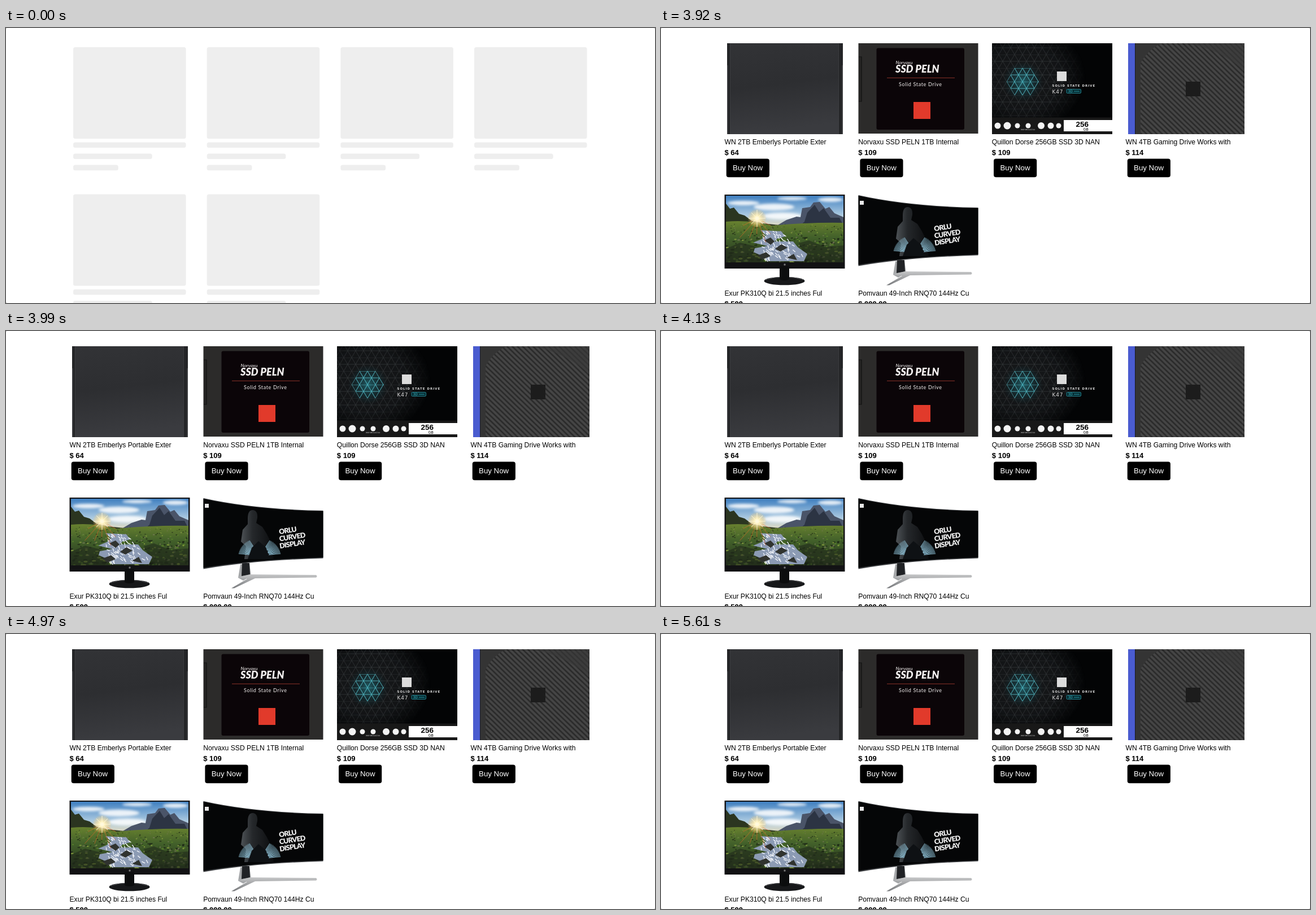
Animation, 1149 px wide and 487 px high, one loop 5.67 s. Source, as an HTML page:

```html
<!DOCTYPE html>
<html lang="en">
<head>
<meta charset="utf-8">
<title>Product grid loading</title>
<style>
  html, body { margin: 0; width: 100%; height: 100%; overflow: hidden; background: #aaa; }
  svg.stage { display: block; width: 100%; height: 100%; font-family: "Liberation Sans", Arial, sans-serif; }
  #skeleton { fill: #eee; animation: loading 5670ms step-end infinite; }
  #products { animation: loaded 5670ms step-end infinite; }
  @keyframes loading { 0% { visibility: visible } 69.1358%, 100% { visibility: hidden } }
  @keyframes loaded { 0% { visibility: hidden } 69.1358%, 100% { visibility: visible } }
  .title { font-size: 12.15px; }
  .price { font-size: 13px; font-weight: 700; }
  .buy { font-size: 13.25px; fill: #fff; }
  .lato { font-family: Lato, sans-serif; fill: #f4f1f0; }
  .wide { font-family: "DejaVu Sans", sans-serif; fill: #ddd; }
  .slogan { font: 900 12.5px Lato, sans-serif; letter-spacing: -.8px; fill: #f2f2f2; }
</style>
</head>
<body>
<svg class="stage" viewBox="0 0 1149 487">
  <defs>
    <linearGradient id="case" x2=".15" y2="1">
      <stop stop-color="#323336"/><stop offset=".5" stop-color="#2d2e31"/><stop offset="1" stop-color="#3a3b3f"/>
    </linearGradient>
    <linearGradient id="sky" x2="0" y2="1">
      <stop stop-color="#3f7fc0"/><stop offset=".55" stop-color="#a9c8e0"/><stop offset="1" stop-color="#f5e3b8"/>
    </linearGradient>
    <linearGradient id="meadow" x2="0" y2="1">
      <stop stop-color="#68812f"/><stop offset=".4" stop-color="#42602a"/><stop offset="1" stop-color="#26331c"/>
    </linearGradient>
    <linearGradient id="silver" x2="0" y2="1">
      <stop stop-color="#c6c7c8"/><stop offset="1" stop-color="#77797c"/>
    </linearGradient>
    <linearGradient id="armour">
      <stop stop-color="#4d5256"/><stop offset=".35" stop-color="#25282b"/><stop offset="1" stop-color="#0b0c0e"/>
    </linearGradient>
    <radialGradient id="sun">
      <stop stop-color="#fff"/><stop offset=".25" stop-color="#fff3c0"/><stop offset="1" stop-color="#ffc860" stop-opacity="0"/>
    </radialGradient>
    <radialGradient id="glow">
      <stop stop-color="#2da5b4" stop-opacity=".5"/><stop offset="1" stop-color="#0b4550" stop-opacity="0"/>
    </radialGradient>
    <radialGradient id="fade">
      <stop stop-color="#fff"/><stop offset=".6" stop-color="#fff" stop-opacity=".8"/><stop offset="1" stop-color="#fff" stop-opacity="0"/>
    </radialGradient>
    <pattern id="mesh" width="14" height="24" patternUnits="userSpaceOnUse" x="640" y="95">
      <rect width="14" height="24" fill="#17191b"/>
      <path d="M0 0L14 24M14 0L0 24M0 12H14M0 0H14" fill="none" stroke="#3a3d40" stroke-width=".8"/>
    </pattern>
    <pattern id="tealMesh" width="14" height="24" patternUnits="userSpaceOnUse" x="640" y="95">
      <path d="M0 0L14 24M14 0L0 24M0 12H14M0 0H14" fill="none" stroke="#53cbd8" stroke-width="1.1"/>
    </pattern>
    <pattern id="ridges" width="6.4" height="6.4" patternUnits="userSpaceOnUse" patternTransform="rotate(-46)">
      <rect width="6.4" height="6.4" fill="#454545"/><rect width="2.8" height="6.4" fill="#2b2b2b"/>
    </pattern>
    <mask id="meshFade"><ellipse cx="640" cy="88" rx="112" ry="95" fill="url(#fade)"/></mask>
    <clipPath id="scene"><path d="M115 297H323V415H115Z"/></clipPath>
    <clipPath id="curve"><path d="M350 298Q440 317 560.5 319V400Q440 403 350 418Z"/></clipPath>
    <clipPath id="chip"><path d="M586 27H799V188H586Z"/></clipPath>
    <filter id="soft"><feGaussianBlur stdDeviation="2"/></filter>
  </defs>

  <rect width="1149" height="487" rx="2" fill="#fff"/>
  <g id="skeleton"></g>

  <g id="products">
    <g id="portableDrive">
      <path d="M117 27H322V188H117Z" fill="url(#case)"/>
      <path d="M117 27H122V188H117ZM315 27H322V188H315Z" fill="#242527"/>
      <path d="M122.5 28V188M314.5 28V188" stroke="#414245" stroke-width=".7"/>
      <path d="M117 66H119V188H117ZM320 66H322V188H320Z" fill="#3b3c3f"/>
    </g>

    <g id="solidState">
      <path d="M349.5 27H561.5V187H349.5Z" fill="#2c2b2a"/>
      <path d="M350 51H355V130H350" fill="#252423" stroke="#111" stroke-width="1.2"/>
      <rect x="381.5" y="35.5" width="155.5" height="144.5" rx="3" fill="#0b0508"/>
      <text class="lato" x="415.5" y="64" font-size="8.5" font-style="italic">Norvaxu</text>
      <text class="lato" x="415" y="78.5" font-size="18" font-style="italic" font-weight="900">SSD PELN</text>
      <path d="M400 88.3H520" stroke="#8b3329"/>
      <text class="lato" x="421" y="102.5" font-size="9" letter-spacing=".65">Solid State Drive</text>
      <rect x="447" y="131" width="30" height="30" fill="#e13a2b"/>
    </g>

    <g id="chipDrive" clip-path="url(#chip)">
      <path d="M586 27H799V188H586Z" fill="#030405"/>
      <path d="M586 27H760V159H586Z" fill="url(#mesh)" mask="url(#meshFade)"/>
      <circle cx="641" cy="95" r="36" fill="url(#glow)"/>
      <path d="M626 71H654L669 95L654 119H626L612 95Z" fill="url(#tealMesh)" opacity=".7"/>
      <rect x="701" y="77" width="17" height="17" fill="#dcdcdc"/>
      <text class="wide" x="692.5" y="103.5" font-size="5.4" font-weight="700" letter-spacing="1.05">SOLID STATE DRIVE</text>
      <text class="wide" x="692.5" y="115.5" font-size="9" letter-spacing=".8">K47</text>
      <rect x="718" y="108.5" width="25.5" height="7" rx="1.5" fill="#052a30" stroke="#2b9eac" stroke-width=".8"/>
      <text class="wide" x="720.5" y="114.4" font-size="6" style="fill:#43c0ce">3D</text>
      <path d="M731 112H741" stroke="#2b9eac"/>
      <path d="M586 158.5H799V188H586Z" fill="#181818"/>
      <g id="marks" fill="#f4f4f4"></g>
      <text class="wide" x="637" y="181" font-size="3">WKP-MRX-ALT-04</text>
      <path d="M713 163H799V183H713Z" fill="#fff"/>
      <text x="734.5" y="175" font-size="13.5" font-weight="700">256</text>
      <text x="747.5" y="182" font-size="6.5">GB</text>
    </g>

    <g id="gamingDrive">
      <path d="M827 27H1033V188H827Z" fill="#343434"/>
      <path d="M849 188V62Q862 38 886 27H1033V188Z" fill="url(#ridges)"/>
      <path d="M925 27Q985 34 1033 76V27Z" fill="#3a3a3a" opacity=".6"/>
      <path d="M827 27H839V188H827Z" fill="#4a5cd0"/>
      <path d="M839.5 27V188" stroke="#191b28"/>
      <rect x="929" y="95" width="26" height="26" fill="#1c1c1c"/>
    </g>

    <g id="flatMonitor">
      <path d="M112.5 295H325.500V426H112.5Z" fill="#121214"/>
      <g clip-path="url(#scene)">
        <path d="M115 297H323V358H115Z" fill="url(#sky)"/>
        <g fill="#fff" opacity=".85" filter="url(#soft)">
          <ellipse cx="146" cy="310" rx="28" ry="4"/><ellipse cx="200" cy="317" rx="36" ry="6"/>
          <ellipse cx="232" cy="302" rx="26" ry="3"/><ellipse cx="300" cy="304" rx="22" ry="4"/>
          <ellipse cx="215" cy="333" rx="34" ry="6"/>
        </g>
        <path d="M205 350L222 340L240 334L247 335L250 319L264 317L270 309L281 308L291 320L298 317L307 328L323 335V362H205Z" fill="#4a5468"/>
        <path d="M254 343L259 327L272 313L280 326L288 319L300 336L316 336L323 350H246Z" fill="#2c3443"/>
        <path d="M115 311L122 320L129 318L138 329L148 332L160 341L180 346L210 349V365H115Z" fill="#2b3520"/>
        <path d="M115 343Q155 339 196 350Q255 344 323 345V415H115Z" fill="url(#meadow)"/>
        <g id="foliage"></g>
        <path d="M115 391L140 380L164 386L178 398L175 415H115ZM244 381L262 376L290 388L323 385V415H262Z" fill="#222c1b" opacity=".6"/>
        <path d="M176 358L213 360L220 369L206 373L201 378L234 378L242 388L259 400L253 413H190L180 404L164 397L166 390L188 386L163 380L178 374L186 367Z" fill="#8c9bb4"/>
        <g id="water" stroke="#f4f7fc" stroke-linecap="round"></g>
        <path d="M183 376L194 371L201 378L194 384ZM202 391L213 383L224 389L211 396ZM171 403L186 397L194 404L179 410ZM223 407L235 400L241 411Z" fill="#30332f"/>
        <g id="rays" stroke="#f0642a" opacity=".7"></g>
        <circle cx="170" cy="337" r="17" fill="url(#sun)"/>
        <path d="M170 322V352M155 337H185M160 327L180 347M180 327L160 347" stroke="#fff8d8" stroke-width=".9"/>
      </g>
      <circle cx="219" cy="419" r="1.7" fill="#777"/>
      <ellipse cx="218.500" cy="448" rx="36" ry="7.3" fill="#17181a"/>
      <path d="M184 446Q218 436 253 446" fill="none" stroke="#4a4b4e"/>
      <path d="M210 422H227V445Q218 449 210 445Z" fill="#0c0d0e"/>
    </g>

    <g id="curvedMonitor">
      <path d="M411 437L415 413H431L434 434L420 442Z" fill="#a5a7a9"/>
      <path d="M418 411H431L432 431L417 434Z" fill="#202225"/>
      <path d="M411 436L433 431L549 432Q552 434.500 549 436.500L441 438L404 455.500L399 455.500L427 439Z" fill="url(#silver)"/>
      <path d="M349.5 296Q440 316 561.500 318V402.500Q440 406 349.5 421.500Z" fill="#3d3f42"/>
      <path d="M349.5 297Q440 317 561.500 319V401Q440 404.500 349.5 419.500Z" fill="#050607"/>
      <g clip-path="url(#curve)">
        <path d="M428 332Q428 317 437 317Q446 318 445 331L443 340L454 347L462 360L470 376L474 404H422L425 381L416 373L419 352L428 342Z" fill="url(#armour)"/>
        <g id="fan" stroke="#94c9df" stroke-linecap="round"></g>
        <path d="M435 384L447 372L460 383L468 404H428Z" fill="#0e1114"/>
      </g>
      <rect x="352" y="306" width="7" height="7" fill="#e8e8e8"/>
      <g class="slogan" transform="translate(484 360) rotate(-9)">
        <text>ORLU</text><text x="-1.5" y="12.500">CURVED</text><text x="-3" y="25">DISPLAY</text>
      </g>
    </g>
  </g>
</svg>
<script>
  const add = (id, markup) => document.getElementById(id).insertAdjacentHTML('beforeend', markup);
  const rect = (x, y, w, h, r) => `<rect x="${x}" y="${y}" width="${w}" height="${h}" rx="${r}"/>`;
  const line = (x, y, angle, from, to, width) => {
    const c = Math.cos(angle), s = Math.sin(angle);
    return `<path d="M${x + from * c} ${y + from * s}L${x + to * c} ${y + to * s}" stroke-width="${width}"/>`;
  };

  const items = [
    ['WN 2TB Emberlys Portable Exter', '64'],
    ['Norvaxu SSD PELN 1TB Internal', '109'],
    ['Quillon Dorse 256GB SSD 3D NAN', '109'],
    ['WN 4TB Gaming Drive Works with', '114'],
    ['Exur PK310Q bi 21.5 inches Ful', '599'],
    ['Pomvaun 49-Inch RNQ70 144Hz Cu', '999.99']
  ];

  items.forEach(([title, price], i) => {
    const dx = (i % 4) * 236.67, row = Math.floor(i / 4);
    const x = 119 + dx, y = 34 + row * 260.4;
    add('skeleton', rect(x, y, 199.6, 162, 3.5) +
      [199.6, 139.7, 79.8].map((w, n) => rect(x, y + 168.4 + n * 20.1, w, 9.6, 3.5)).join(''));

    const left = 112.5 + dx, base = 206.4 + row * 268;
    add('products', `<text class="title" x="${left}" y="${base}">${title}</text>
      <text class="price" x="${left}" y="${base + 18.4}">$ ${price}</text>
      ${rect(left + 3.2, base + 25, 76.2, 32.8, 4)}
      <text class="buy" x="${left + 14.6}" y="${base + 45.6}">Buy Now</text>`);
  });

  [[596, 5.5], [613, 6.5], [631, 4.5], [650, 4.5], [673, 6], [690, 5.5], [704, 4.5]].forEach(([x, r]) =>
    add('marks', `<circle cx="${x}" cy="173" r="${r}"/>`));

  let seed = 17;
  const random = () => (seed = seed * 16807 % 2147483647) / 2147483647;
  const greens = ['#1c2615', '#96ad43', '#5f8a2c', '#34521f', '#777b58', '#161d13'];
  for (let i = 0; i < 420; i++) {
    const depth = random();
    add('foliage', `<ellipse cx="${115 + random() * 208}" cy="${347 + depth * 68}"
      rx="${1 + depth * 4 * random()}" ry="${.6 + depth * 1.3}" fill="${greens[Math.floor(random() * 6)]}" opacity=".7"/>`);
  }

  // Short streaks that widen and drift right as the stream falls.
  for (let i = 0; i < 90; i++) {
    const depth = random(), spread = 18 + depth * 22;
    add('water', line(194 + depth * 24 + (random() * 2 - 1) * spread, 360 + depth * 50, .3 + random() * 1.1, 0, 3 + depth * 3, 1.3));
  }

  for (let i = 0; i < 7; i++) add('rays', line(170, 337, .5 + i * .36, 10, 28 + i % 3 * 9, .8));
  for (let i = 0; i < 17; i++) {
    const angle = -.1 - i * .055;
    for (const side of [angle, Math.PI - angle]) add('fan', line(449, 398, side, 15 + 3 * Math.sin(i), 37 - i * .3, .9));
  }
</script>
</body>
</html>
```
